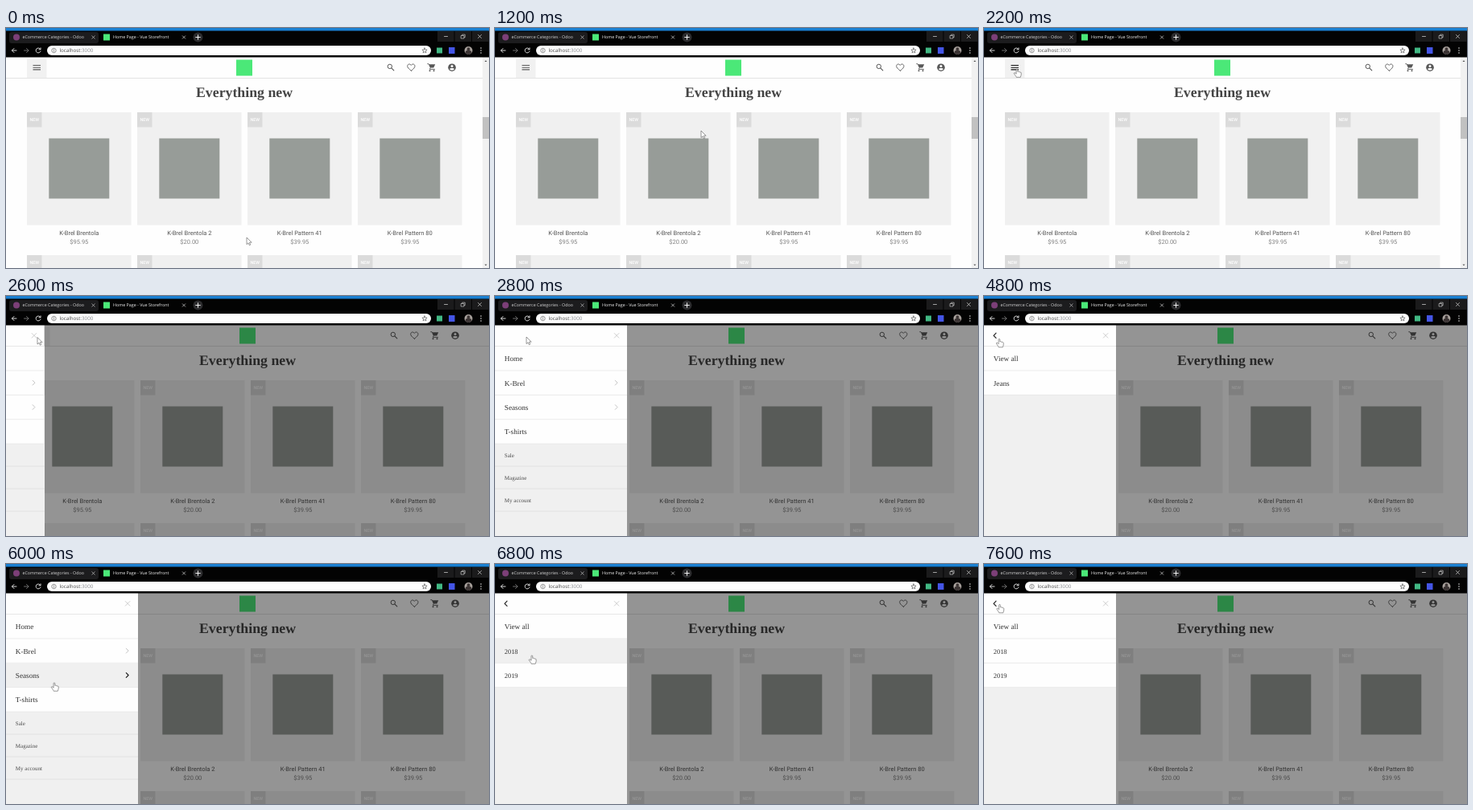
Write an HTML page that moves like this. It is 600x299 px and loops after 8 s.

```html
<!DOCTYPE html>
<html lang="en">
<head>
<meta charset="utf-8">
<title>Storefront menu</title>
<style>
html, body { margin: 0; width: 100%; height: 100%; overflow: hidden; background: #fff; }
svg { display: block; width: 100vw; height: 100vh; }
text { text-rendering: geometricPrecision; }
.ui { font-family: "Open Sans", "Noto Sans", sans-serif; }
.body { font-family: Roboto, Inter, sans-serif; }
.serif { font-family: "Liberation Serif", "Noto Serif", serif; }
.line { fill: none; stroke-linecap: round; stroke-linejoin: round; }
</style>
</head>
<body>
<svg id="stage" viewBox="0 0 600 299" xmlns="http://www.w3.org/2000/svg">
  <defs>
    <clipPath id="pageClip"><rect y="36" width="600" height="263"/></clipPath>
    <clipPath id="drawerClip"><rect y="36" width="164" height="263"/></clipPath>
  </defs>
  <g clip-path="url(#pageClip)">
    <rect y="36" width="600" height="263" fill="#fefefe"/>
    <g id="page"></g>
    <g id="scrollbar">
      <rect x="592" y="36" width="8" height="263" fill="#f1f1f1"/>
      <rect x="592" y="111" width="8" height="27" fill="#c1c1c1"/>
      <path d="M594.500 42l1.500-1.700 1.500 1.700zM594.500 294.500l1.500 1.700 1.500-1.700z" fill="#505050"/>
    </g>
    <rect id="overlay" y="36" width="600" height="263" fill="#000" fill-opacity=".42"/>
    <g id="drawer">
      <g clip-path="url(#drawerClip)">
        <rect y="36" width="164" height="263" fill="#fefefe"/>
        <g id="mainMenu"></g>
        <g id="starMenu"></g>
        <g id="seasonMenu"></g>
        <path d="M0 62.500H164" stroke="#e3e3e3" stroke-width=".8"/>
        <path class="line" d="M148.300 46.500l5.600 5.600m0-5.600l-5.600 5.600" stroke="#cfcfcf" stroke-width="1"/>
        <path id="back" class="line" d="M15 46.200l-3 3.100 3 3.100" stroke="#222" stroke-width="1.200"/>
      </g>
    </g>
  </g>
  <g id="browser"></g>
  <g id="cursor" stroke="#555" stroke-width=".6" stroke-linejoin="round" fill="#fff">
    <path id="arrow" d="M0 0V8.600L2 6.800 3.300 9.700 4.700 9.100 3.400 6.200H6.100Z"/>
    <path id="hand" d="M-.9.700C-.9-.3.800-.3.800.700V3.400C1.600 2.900 2.300 3.200 2.400 3.800 3.100 3.300 3.800 3.700 3.900 4.300 4.600 4 5.200 4.400 5.200 5.100V7.300C5.200 8.500 4.300 9 4.300 10.300H-.8C-1-.1-.800 8.800-3.500 5.900-4.100 4.900-2.900 4.300-2 5.100L-.9 6.200Z" style="display:none"/>
    <path id="finger" d="M-.9.700C-.9-.3.800-.3.800.700V3.400C1.600 2.900 2.300 3.200 2.400 3.800 3.100 3.300 3.800 3.700 3.900 4.300 4.600 4 5.200 4.400 5.200 5.100V7.300C5.200 8.500 4.300 9 4.300 10.300H-.8C-1 9.300-2 8.300-3.500 5.900-4.100 4.900-2.900 4.300-2 5.100L-.9 6.200Z"/>
  </g>
</svg>
<script>
const LOOP = 8000, STEP = 200, DRAWER = 164;
const $ = id => document.getElementById(id);
const show = (id, on) => $(id).setAttribute("display", on ? "inline" : "none");
const move = (id, x, y = 0) => $(id).setAttribute("transform", `translate(${x} ${y})`);

// Markup helpers
const rect = (x, y, w, h, fill, more = "") =>
  `<rect x="${x}" y="${y}" width="${w}" height="${h}" fill="${fill}" ${more}/>`;
const disc = (x, y, r, fill) => `<circle cx="${x}" cy="${y}" r="${r}" fill="${fill}"/>`;
const line = (d, color, width = 1) =>
  `<path class="line" d="${d}" stroke="${color}" stroke-width="${width}"/>`;
const text = (x, y, str, cls, size, fill, more = "") =>
  `<text x="${x}" y="${y}" class="${cls}" font-size="${size}" fill="${fill}" ${more}>${str}</text>`;
const MID = 'text-anchor="middle"';

function drawBrowser() {
  const cross = (x, y, r, c) => line(`M${x - r} ${y - r}l${2 * r} ${2 * r}m0 ${-2 * r}l${-2 * r} ${2 * r}`, c, .7);
  const dots = [25, 28, 31].map(y => disc(590, y, .8, "#ddd")).join("");
  const buttons = [536, 557.5, 579].map(x => rect(x, 4, 20.5, 13, "#1b1b1c")).join("");
  $("browser").innerHTML =
    rect(0, 0, 600, 36.5, "#030303") +
    rect(0, 0, 600, 3.5, "#1a80d2") +
    rect(4, 5, 111, 14, "#1c1c1e", 'rx="3"') +
    buttons +
    disc(13, 11.5, 4, "#7c3f78") +
    text(20.5, 13.4, "eCommerce Categories - Odoo", "ui", 5.35, "#d6d6d6") +
    cross(108.5, 11.5, 1.7, "#c8c8c8") +
    rect(121, 7.5, 8, 8, "#4be878") +
    text(133, 13.4, "Home Page - Vue Storefront", "ui", 5.35, "#f4f4f4") +
    cross(221, 11.5, 1.7, "#ddd") +
    disc(238.5, 11.5, 6, "#2c2c2e") +
    line("M235.700 11.500h5.600m-2.800-2.800v5.600", "#fff", .9) +
    line("M544.500 10.500h4", "#ddd", .7) +
    line("M565.500 9.500h3.500v3.500h-3.500zM566.700 9.300v-1.200h3.500v3.500h-1", "#ddd", .6) +
    cross(588.5, 10.5, 2, "#ddd") +
    // toolbar
    line("M13 28H7.500m2.500-2.600L7.400 28 10 30.600", "#eee", .9) +
    line("M22.500 28H28m-2.500-2.600L28.100 28l-2.600 2.600", "#777", .9) +
    line("M42.700 26.300A3 3 0 1 0 43 29M43 24.800v2h-2", "#eee", .9) +
    rect(51, 22, 477, 12, "#fdfdfd", 'rx="6"') +
    `<circle cx="59.500" cy="28" r="2.700" fill="none" stroke="#666" stroke-width=".7"/>` +
    line("M59.500 27.800v1.400m0-2.600v.1", "#666", .7) +
    text(66.5, 30.2, 'localhost<tspan fill="#85888c">:3000</tspan>', "ui", 6.2, "#444") +
    line("M520 25l.9 2 2.200.200-1.700 1.500.500 2.100-1.900-1.100-1.900 1.100.500-2.100-1.700-1.500 2.200-.200z", "#555", .7) +
    rect(535, 24.5, 7, 7, "#41b883") +
    rect(550, 24, 7.5, 8, "#4455e6") +
    disc(574.5, 28, 5, "#a9a29d") +
    `<path d="M570.500 31a4 3.500 0 0 1 8 0a5 5 0 0 1-8 0z" fill="#3b3434"/>` + disc(574.5, 26.2, 1.9, "#3b3434") +
    dots;
}

const goods = [
  ["K-Brel Brentola", "$95.95"],
  ["K-Brel Brentola 2", "$20.00"],
  ["K-Brel Pattern 41", "$39.95"],
  ["K-Brel Pattern 80", "$39.95"]
];

function card([name, price], i) {
  const x = 26 + 137 * i, mid = x + 64.8;
  const top = y => rect(x, y, 129.5, 140.5, "#f0f0f0") + rect(x, y, 18.5, 18.5, "#dbdbdb") +
    text(x + 9.25, y + 11.2, "NEW", "body", 5.4, "#fff", MID + ' font-weight="500"');
  return top(105) + rect(mid - 37.5, 137.5, 75, 75, "#979c98") +
    text(mid, 257.6, name, "body", 7.5, "#555", MID) +
    text(mid, 269.2, price, "body", 7.5, "#828282", MID) + top(283);
}

function drawPage() {
  const ink = "#575757";
  $("page").innerHTML =
    rect(26, 38.5, 24.5, 23.5, "#f1f1f1") +
    `<path id="burger" d="M33.500 46.500h9.500m-9.500 2.700h9.500m-9.500 2.700h9.500" stroke-width="1.100"/>` +
    rect(286, 39.5, 20, 20, "#4be878") +
    line("M-10 62.500H610", "#dcdcdc", .8) +
    `<circle cx="476.800" cy="47.900" r="2.700" fill="none" stroke="${ink}" stroke-width="1"/>` +
    line("M479 50.100l2.800 2.800", ink, 1.1) +
    line("M503.300 53.300C500 50.500 498.700 49.300 498.700 47.500 498.700 44.700 502 44.200 503.300 46.400 504.600 44.200 507.900 44.700 507.900 47.500 507.900 49.300 506.600 50.500 503.300 53.300Z", ink, .9) +
    line("M523.700 44.700h1.400l2.200 4.700-1 2h6.200", ink, .9) +
    `<path d="M525.500 45.300h7.700l-2 4.200h-4z" fill="${ink}"/>` +
    disc(526.5, 53.2, 1, ink) + disc(531.5, 53.2, 1, ink) +
    disc(554, 49.2, 4.8, ink) + disc(554, 47.4, 1.5, "#fff") +
    `<path d="M551 51.300c.700-1.800 5.300-1.800 6 0-1.300 1.900-4.700 1.900-6 0z" fill="#fff"/>` +
    text(296, 86, "Everything new", "serif", 17.8, "#454545", MID + ' font-weight="bold"') +
    goods.map(card).join("");
}

// Rows are 30.4 high; [label, has children]
const ROW = 30.4, TOP = 62.5;
const menus = {
  mainMenu: [["Home"], ["K-Brel", 1], ["Seasons", 1], ["T-shirts"]],
  starMenu: [["View all"], ["Jeans"]],
  seasonMenu: [["View all"], ["2018"], ["2019"]]
};
const links = ["Sale", "Magazine", "My account"];

function drawMenu(id, hover) {
  const rows = menus[id];
  const end = TOP + rows.length * ROW;
  let out = rect(0, TOP, DRAWER, 237, "#fefefe") + rect(0, end, DRAWER, 200, "#f0f0f0");
  rows.forEach(([label, more], i) => {
    const y = TOP + i * ROW, on = i === hover;
    if (on) out += rect(0, y, DRAWER, ROW, "#f0f0f0");
    out += text(11.8, y + 18.6, label, "serif", /\d/.test(label) ? 8.4 : 9.2, "#333");
    if (more) out += line(`M149.300 ${y + 12.3}l2.800 2.900-2.800 2.900`, on ? "#222" : "#c4c4c4", on ? 1.2 : 1);
    out += line(`M0 ${y + ROW}H${DRAWER}`, "#e6e6e6", .8);
  });
  if (id === "mainMenu") links.forEach((label, i) => {
    const y = end + 28 * i;
    out += text(11.8, y + 16.7, label, "serif", 7, "#4a4a4a") + line(`M0 ${y + 28}H${DRAWER}`, "#dedede", .8);
  });
  $(id).innerHTML = out;
}

// Pointer stops: time, x, y
const stops = [
  [0, 299, 261], [1200, 256, 128], [2200, 41, 51], [2400, 41, 51], [2600, 39, 51.5],
  [2800, 39, 51], [3600, 62, 107], [3800, 62, 107], [4800, 19, 53.5], [5000, 19, 53.5],
  [6000, 60, 148], [6400, 60, 148], [7400, 20, 51.5], [7600, 19.5, 50.5], [LOOP, 19.5, 50.5]
];
const ease = (t, from, span) => {
  const p = Math.min(1, Math.max(0, (t - from) / span));
  return p * p * (3 - 2 * p);
};

function pointer(t) {
  const i = stops.findIndex((s, k) => k + 1 === stops.length - 1 || t < stops[k + 1][0]);
  const [t0, x0, y0] = stops[i], [t1, x1, y1] = stops[i + 1];
  const p = ease(t, t0, t1 - t0);
  return [x0 + (x1 - x0) * p, y0 + (y1 - y0) * p];
}

function render(now) {
  const t = Math.floor((now % LOOP) / STEP) * STEP;
  const open = t >= 2600;
  const [x, y] = pointer(t);
  const slide = ease(t, 2500, 280);
  const star = ease(t, 3700, 300) - ease(t, 4900, 300);
  const season = ease(t, 6300, 300);
  const sub = Math.max(star, season);
  const inDrawer = open && x < DRAWER * slide;
  const onBurger = !open && x > 26 && x < 50 && y < 62;
  const onBack = inDrawer && sub > .9 && x < 26 && y < TOP;
  const hover = inDrawer && y >= TOP ? Math.floor((y - TOP) / ROW) : -1;
  const active = sub < .5 ? "mainMenu" : star > season ? "starMenu" : "seasonMenu";

  move("page", open ? 4 : 0);
  $("burger").setAttribute("stroke", onBurger ? "#111" : "#5a5a5a");
  show("scrollbar", !open);
  show("overlay", open);
  show("drawer", open);
  move("drawer", DRAWER * (slide - 1));
  for (const id in menus) drawMenu(id, id === active ? hover : -1);
  show("starMenu", star > 0);
  show("seasonMenu", season > 0);
  move("starMenu", DRAWER * (1 - star));
  move("seasonMenu", DRAWER * (1 - season));
  show("back", sub > 0);
  $("back").setAttribute("opacity", sub);

  const hand = onBurger || onBack || (hover >= 0 && hover < menus[active].length);
  move("cursor", x, y);
  show("finger", hand);
  show("arrow", !hand);
}

drawBrowser();
drawPage();
const start = performance.now();
function tick() {
  render(performance.now() - start);
  requestAnimationFrame(tick);
}
tick();
</script>
</body>
</html>
```
